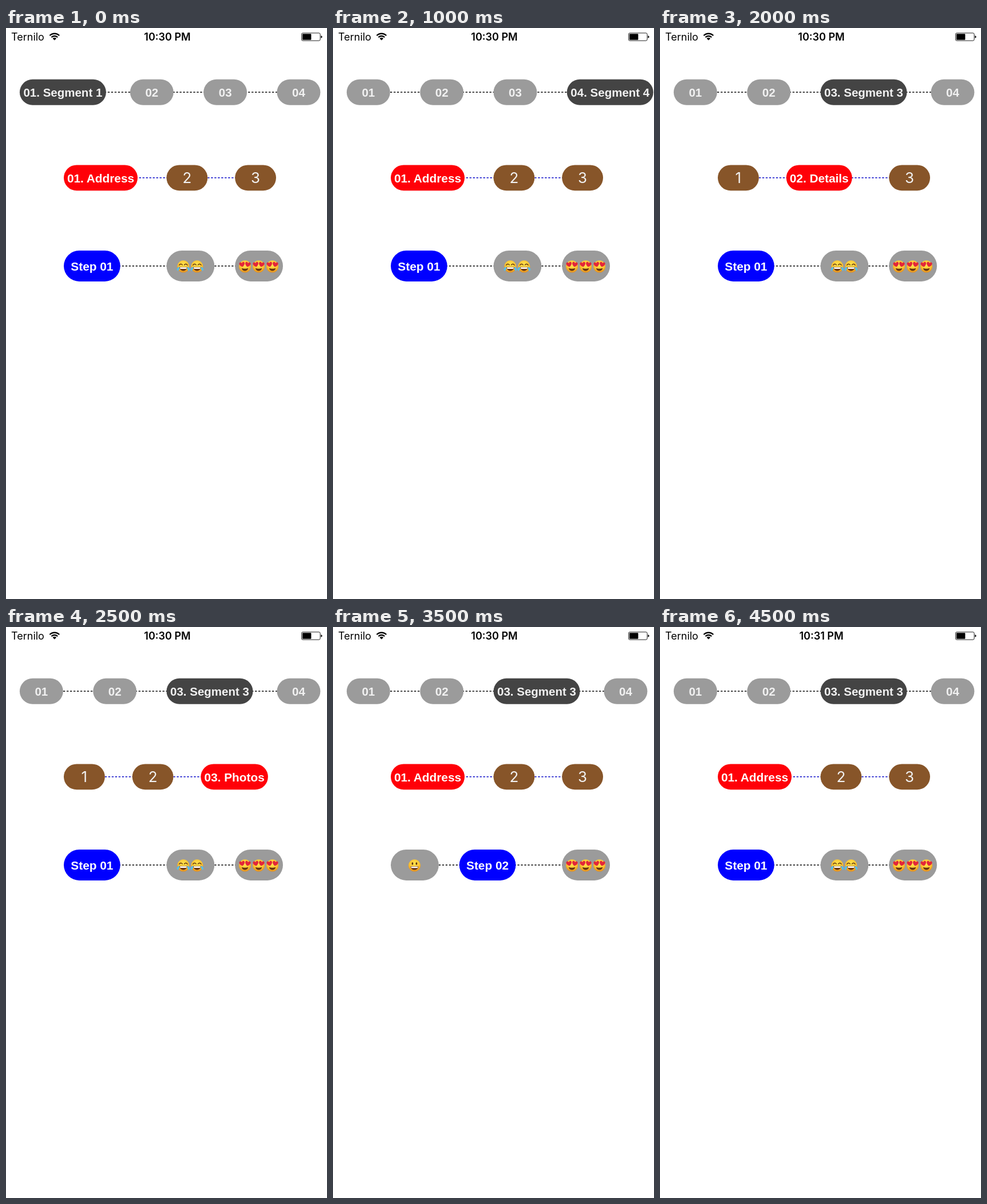
An HTML page that plays this animation: 561 px wide and 998 px high, repeating every 5000 ms.

```html
<!DOCTYPE html>
<html lang="en">
<head>
<meta charset="utf-8">
<title>Segmented steps</title>
<style>
  html, body { margin: 0; width: 100%; height: 100%; overflow: hidden; background: #fff; }
  svg { display: block; width: 561px; height: 998px; }
  .status { font: 400 18px Inter, sans-serif; }
  #clock { font-weight: 600; }
  .pill { font: 700 20.8px "Liberation Sans", Arial, sans-serif; fill: #fff; text-anchor: middle; }
  .soft { font-size: 20.5px; fill: #f1f1f1; }
  .number { font: 400 26px Inter, sans-serif; fill: #f1f1f1; }
</style>
</head>
<body>
<svg viewBox="0 0 561 998">
  <defs>
    <radialGradient id="skin" cx=".5" cy=".35" r=".65">
      <stop offset="0" stop-color="#ffe64f"/>
      <stop offset=".6" stop-color="#fcc735"/>
      <stop offset="1" stop-color="#e28a1c"/>
    </radialGradient>
    <g id="grin">
      <circle r="10.6" fill="url(#skin)"/>
      <ellipse cx="-3.5" cy="-3.4" rx="1.4" ry="2.3" fill="#5c3510"/>
      <ellipse cx="3.5" cy="-3.4" rx="1.4" ry="2.3" fill="#5c3510"/>
      <path d="M-6.8 1.2H6.8C6.4 9.8-6.4 9.8-6.8 1.2Z" fill="#69330f"/>
      <path d="M-6.1 1.7H6.1L5.4 4.2H-5.4Z" fill="#fff"/>
    </g>
    <g id="laugh">
      <circle r="10.6" fill="url(#skin)"/>
      <path d="M-7.2 -2.6Q-4.3 -6.4-1.6 -2.8M7.2 -2.6Q4.3 -6.4 1.6 -2.8" fill="none" stroke="#673a12" stroke-width="1.5" stroke-linecap="round"/>
      <path d="M-6.8 .8H6.8C6.4 9.8-6.4 9.8-6.8 .8Z" fill="#69330f"/>
      <path d="M-6.1 1.3H6.1L5.4 4H-5.4Z" fill="#fff"/>
      <path d="M-6.8 .2C-11 1.2-12.4 5.3-10.5 7C-8.2 8.4-6.8 4.6-6.8 .2ZM6.8 .2C11 1.2 12.4 5.3 10.5 7C8.2 8.4 6.8 4.6 6.8 .2Z" fill="#55bdea"/>
    </g>
    <path id="heart" d="M0 4.2C-7.2 .2-5-5.2-1.8-4.2Q-.4-3.8 0-2.2Q.4-3.8 1.8-4.2C5-5.2 7.2 .2 0 4.2Z" fill="#e32639"/>
    <g id="love">
      <circle r="10.6" fill="url(#skin)"/>
      <use href="#heart" transform="translate(-5 -3.5) rotate(-10)"/>
      <use href="#heart" transform="translate(5 -3.5) rotate(10)"/>
      <path d="M-5.6 2.8Q0 4.6 5.6 2.8C5 9.2-5 9.2-5.6 2.8Z" fill="#69330f"/>
    </g>
  </defs>

  <rect width="561" height="998" fill="#fff"/>
  <text class="status" x="9" y="21.8">Ternilo</text>
  <g transform="translate(84.8 21.6)" fill="none" stroke="#000" stroke-width="2.3">
    <path d="M-8.4 -8.4A11.9 11.9 0 0 1 8.4 -8.4M-5.4 -5.4A7.7 7.7 0 0 1 5.4 -5.4"/>
    <path d="M0 0L-3.3 -3.3A4.7 4.7 0 0 1 3.3 -3.3Z" fill="#000" stroke="none"/>
  </g>
  <text class="status" id="clock" x="282" y="21.8" text-anchor="middle"></text>
  <rect x="516.5" y="8.8" width="32.6" height="13.4" rx="2.2" fill="none" stroke="#222"/>
  <rect x="518" y="10.3" width="15.4" height="10.4" rx=".8"/>
  <path d="M550.4 13.2Q552.6 13.5 552.6 15.5T550.4 17.8Z"/>
  <g id="rows"></g>
</svg>
<script>
const STEP_MS = 500;

// Selected index in each row, one entry per step.
const steps = [
  [0, 0, 0], [1, 0, 0], [3, 0, 0], [2, 0, 0], [2, 1, 0],
  [2, 2, 0], [2, 0, 0], [2, 0, 1], [2, 0, 2], [2, 0, 0]
];
const CLOCK_CHANGE = 8;

const rows = [
  {
    x: 23.9, y: 89.8, h: 44.9, width: 75.9, slot: 128.3, wideSlot: 193,
    idle: '#9b9b9b', active: '#444', line: '#000', dashX: 28.2,
    idleClass: 'pill soft', activeClass: 'pill soft', baseline: 7.4, idleBaseline: 7.4,
    labels: ['01', '02', '03', '04'],
    titles: ['01. Segment 1', '02. Segment 2', '03. Segment 3', '04. Segment 4'],
    widths: [151, 151, 151, 151]
  },
  {
    x: 101, y: 239.4, h: 44.9, width: 71.8, slot: 119.7, wideSlot: 179.5,
    idle: '#875529', active: '#ff0008', line: '#0000c8', dashX: 101,
    idleClass: 'pill number', activeClass: 'pill', baseline: 7.8, idleBaseline: 9.4,
    labels: ['1', '2', '3'],
    titles: ['01. Address', '02. Details', '03. Photos'],
    widths: [129, 115, 117.5]
  },
  {
    x: 101, y: 389, h: 53.9, width: 83.8, slot: 119.7, wideSlot: 179.5,
    idle: '#9b9b9b', active: '#00f', line: '#000', dashX: 101,
    activeClass: 'pill', baseline: 7.6,
    faces: ['grin', 'laugh', 'love'],
    titles: ['Step 01', 'Step 02', 'Step 03'],
    widths: [98.7, 98.7, 98.7]
  }
];

const label = (x, y, cls, text) => `<text class="${cls}" x="${x}" y="${y}">${text}</text>`;

const faceGroup = (name, count, x, y) =>
  Array.from({ length: count }, (_, i) =>
    `<use href="#${name}" x="${x + (i - (count - 1) / 2) * 24}" y="${y}"/>`).join('');

function drawRow(row, selected) {
  const mid = row.y + row.h / 2;
  let x = row.x, pills = '', lineEnd = x;
  row.titles.forEach((title, i) => {
    const on = i === selected;
    const w = on ? row.widths[i] : row.width;
    const cx = x + w / 2;
    pills += `<rect x="${x}" y="${row.y}" width="${w}" height="${row.h}" rx="${row.h / 2}" fill="${on ? row.active : row.idle}"/>`;
    if (on) pills += label(cx, mid + row.baseline, row.activeClass, title);
    else if (row.faces) pills += faceGroup(row.faces[i], i + 1, cx - 0.5, mid + 1);
    else pills += label(cx, mid + row.idleBaseline, row.idleClass, row.labels[i]);
    lineEnd = x + 10;
    x += on ? row.wideSlot : row.slot;
  });
  return `<path d="M${row.dashX} ${mid}H${lineEnd}" stroke="${row.line}" stroke-width="1.5" stroke-dasharray="3.3 2.684"/>${pills}`;
}

const rowLayer = document.getElementById('rows');
const clock = document.getElementById('clock');
const start = performance.now();
let shown = -1;

function render(now) {
  const step = Math.floor(Math.max(0, now - start) / STEP_MS) % steps.length;
  if (step !== shown) {
    shown = step;
    rowLayer.innerHTML = rows.map((row, i) => drawRow(row, steps[step][i])).join('');
    clock.textContent = step < CLOCK_CHANGE ? '10:30 PM' : '10:31 PM';
  }
  requestAnimationFrame(render);
}
render(start);
</script>
</body>
</html>
```
